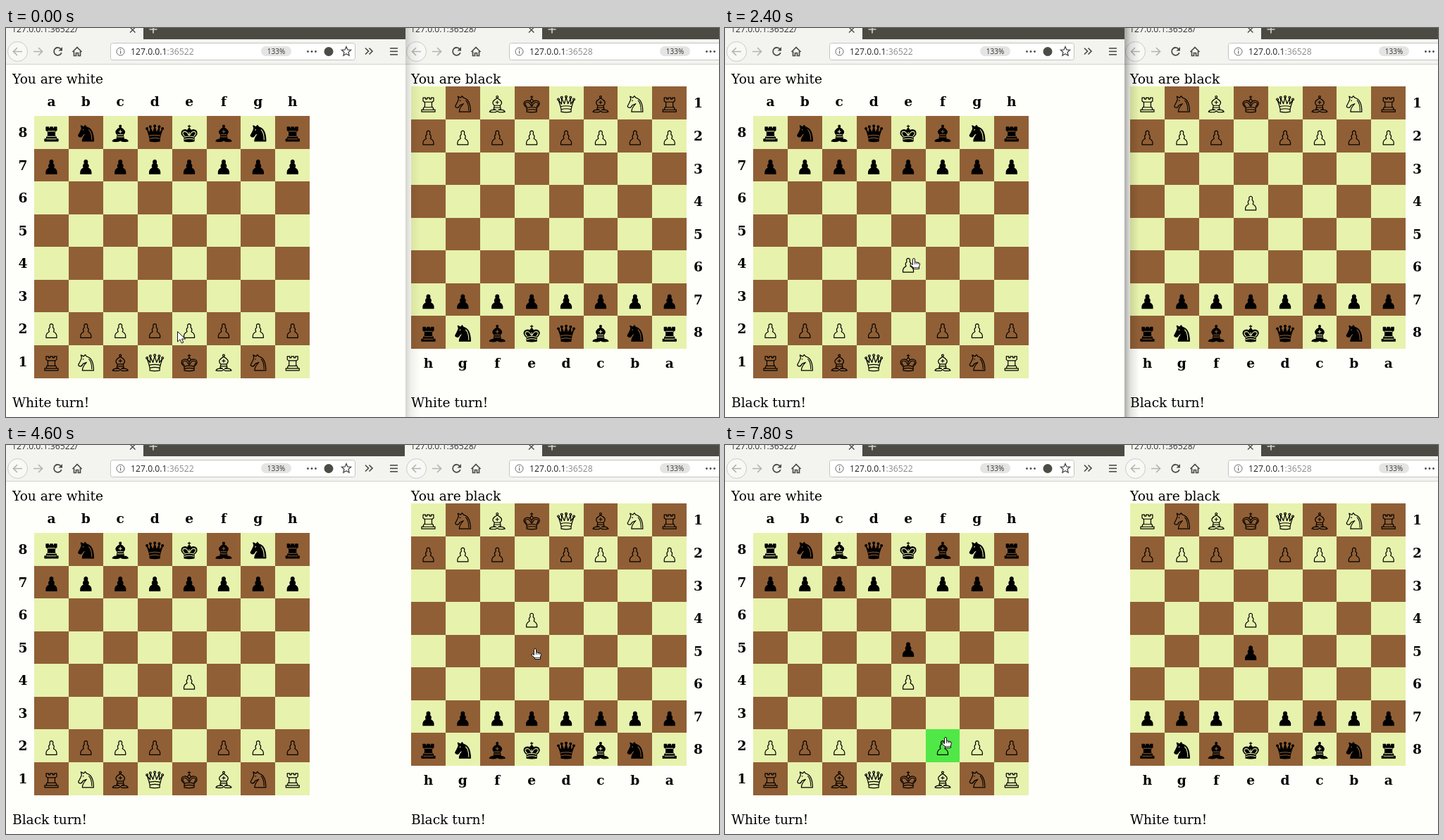
An HTML page with a canvas for the animation above (8000 ms loop, 1012 px wide and 553 px high).

```html
<!DOCTYPE html>
<html lang="en">
<head>
<meta charset="utf-8">
<title>Two player chess</title>
<style>
  html, body { margin: 0; width: 100%; height: 100%; overflow: hidden; background: #fefffa; }
  canvas { display: block; }
</style>
</head>
<body>
<canvas id="stage" width="1012" height="553"></canvas>
<script>
const ctx = document.getElementById('stage').getContext('2d');
const LOOP = 8000, STEP = 100, SPLIT = 567;
const SERIF = '18.6px "DejaVu Serif", "Noto Serif", serif';
const UI = 'Ubuntu, "Open Sans", sans-serif';
const DARK = '#4b4b48', FAINT = '#b4b4b0';

// Cursor moves: first step, last step, x and y reached (top left of the hand)
const MOVES = [
  [0, 0, 243, 431], [200, 200, 239, 431], [400, 400, 253, 431], [600, 600, 255, 431],
  [800, 800, 250, 431], [1200, 1200, 254, 415], [1300, 1500, 270, 340], [1600, 1700, 262, 327],
  [2700, 2700, 263, 329], [2900, 3000, 320, 335], [3100, 3400, 725, 386], [3500, 3600, 745, 394],
  [3800, 3800, 739, 365], [3900, 3900, 744, 309], [4000, 4100, 747, 280], [4200, 4300, 745, 289],
  [6600, 6600, 725, 298], [6700, 6900, 519, 352], [7100, 7100, 367, 391],
  [7200, 7400, 318, 417], [7500, 7800, 307, 415]
];

// Body outline and inner lines of each piece, standing on the origin
const dot = (x, y) => `M${x - 1.4} ${y}a1.4 1.4 0 1 0 2.8 0a1.4 1.4 0 1 0 -2.8 0z`;
const PIECES = {
  p: ['M-7.5-.5V-3.5Q-7-7-3-9Q-5-13-2-15Q-3.4-20 0-20.2Q3.4-20 2-15Q5-13 3-9Q7-7 7.500-3.500V-.5z', ''],
  r: ['M-9.500-.5V-3.500H-7V-6L-5-8V-14L-7.500-16V-20.500H-4V-18.500H-1.800V-20.500H1.800V-18.500H4V-20.500H7.500V-16' +
    'L5-14V-8L7-6V-3.500H9.500V-.5z', 'M-6-7H6M-5.500-14.500H5.500M-7-3.500H7'],
  n: ['M-5-.5Q-5-6 1-12L-4-10Q-6-6-8-6.500Q-11-7-10.500-9Q-7-15-6-18.500L-7-22.500L-3-20.500L-1-23L1-20.500Q11-18 11-.5z',
    'M-4.500-16l1.500-1M4-17Q8.500-13 8.500-2'],
  b: ['M-11-.5Q-9.500-3.500-5-3.200H-1.500L-5-4.500L-4-9.500Q-7-12-6-15Q-4-18 0-20Q4-18 6-15Q7-12 4-9.500L5-4.500' +
    'L1.500-3.200H5Q9.500-3.500 11-.5Q5 .5 2-.300L0-1.800L-2-.300Q-5 .5-11-.5z' + dot(0, -21.8),
    'M0-16.500V-11.500M-2.500-14H2.500M-4-9.500H4M-4.500-6.500H4.500'],
  q: ['M-7-.5V-4L-8.500-10L-11-17.500L-6.500-11.500V-20L-2.500-12L0-21L2.500-12L6.500-20V-11.500L11-17.500L8.500-10L7-4V-.5Q0 1-7-.5z' +
    dot(-11, -18.3) + dot(-6.3, -21) + dot(0, -22) + dot(6.3, -21) + dot(11, -18.3),
    'M-8-8Q0-10 8-8M-7-4Q0-6 7-4'],
  k: ['M-7-.5V-6Q-13-11-10-15Q-5-19 0-13Q5-19 10-15Q13-11 7-6V-.5Q0 1-7-.5z' +
    'M0-13Q-4.500-15.500 0-19Q4.500-15.500 0-13zM0-19V-23.500M-2.200-21.700H2.200',
    'M0-13V-8M-6.500-7.500Q-10.500-11-8.500-13.500Q-4-16-.8-9M6.500-7.500Q10.500-11 8.500-13.500Q4-16 .8-9M-7-6Q0-8.500 7-6M-7-3Q0-5 7-3']
};

function rect(x, y, w, h, fill) {
  ctx.fillStyle = fill;
  ctx.fillRect(x, y, w, h);
}

function text(str, x, y, font, fill = '#000', align = 'left') {
  ctx.font = font;
  ctx.fillStyle = fill;
  ctx.textAlign = align;
  ctx.fillText(str, x, y);
}

function shape(d, stroke, fill, width = 1.5) {
  const path = new Path2D(d);
  ctx.lineWidth = width;
  if (fill) { ctx.fillStyle = fill; ctx.fill(path); }
  if (stroke) { ctx.strokeStyle = stroke; ctx.stroke(path); }
}

function circle(x, y, r, stroke, fill) {
  shape(`M${x - r} ${y}a${r} ${r} 0 1 0 ${2 * r} 0a${r} ${r} 0 1 0 ${-2 * r} 0z`, stroke, fill, 1);
}

function pill(x, y, w, h, r, stroke, fill) {
  ctx.beginPath();
  ctx.roundRect(x, y, w, h, r);
  ctx.fillStyle = fill;
  ctx.fill();
  if (stroke) { ctx.lineWidth = 1; ctx.strokeStyle = stroke; ctx.stroke(); }
}

function star(x, y) {
  let d = '';
  for (let i = 0; i < 10; i++) {
    const a = i * Math.PI / 5, r = i % 2 ? 3.2 : 7;
    d += `${i ? 'L' : 'M'}${x + r * Math.sin(a)} ${y - r * Math.cos(a)}`;
  }
  shape(d + 'z', DARK, null, 1.3);
}

function browser(port) {
  rect(0, 0, 600, 52, '#f3f3f0');
  rect(195, 0, 405, 16, '#4b4a43');
  rect(0, 51, 600, 1, '#d2d2ce');
  rect(0, 52, 600, 501, '#fefffa');
  text(`127.0.0.1:${port}/`, 8, 6, '12.2px ' + UI, '#333');
  shape('M176-1l7.500 7.500M183.500-1l-7.500 7.500', DARK, null, 1.4);
  shape('M203.500 2h11M209-3v10.500', '#d5d4cc', null, 1.6);

  circle(16.5, 33.5, 14, '#cacac6', '#f8f8f6');
  shape('M23 33.500H11M16 28l-5.500 5.500l5.500 5.500', FAINT, null, 1.7);
  shape('M39 33.500H51M46 28l5.500 5.500l-5.500 5.500', FAINT, null, 1.7);
  shape('M78 30a5.500 5.500 0 1 0 .800 5', DARK, null, 1.8);
  shape('M80 27v5.500h-5.500z', null, DARK);
  shape('M94.500 34l6.500-6.500l6.500 6.500M96.500 33v6.500h3v-4h3v4h3v-6.500', DARK, null, 1.7);

  pill(148.5, 21.5, 347, 24, 3, '#c4c4c0', '#fff');
  circle(162.5, 33.5, 5.5, '#666');
  rect(162, 32.5, 1.2, 4, '#666');
  rect(162, 30, 1.2, 1.3, '#666');
  const font = '12.2px ' + UI, host = '127.0.0.1';
  text(host, 177, 38, font, '#222');
  text(':' + port, 177 + ctx.measureText(host).width, 38, font, '#8a8a88');
  pill(362, 26, 43, 14, 7, null, '#e4e4e2');
  text('133%', 383.5, 37, '10px ' + UI, '#333', 'center');
  for (const x of [428.5, 434, 439.5]) circle(x, 33.5, 1.4, null, DARK);
  circle(458, 33.5, 6.5, null, DARK);
  star(483, 33.5);
  shape('M510 28.500l4.500 4.500l-4.500 4.500M515.500 28.500l4.500 4.500l-4.500 4.500', DARK, null, 1.7);
  for (const y of [28, 32.5, 37]) rect(545, y, 11, 1.6, DARK);
}

// Upper case is white, lower case is black
function pieceAt(file, rank, whiteMoved, blackMoved) {
  if (file === 4 && rank > 1 && rank < 8) {
    if (rank === (whiteMoved ? 4 : 2)) return 'P';
    return rank === (blackMoved ? 5 : 7) ? 'p' : '';
  }
  return { 1: 'RNBQKBNR'[file], 2: 'P', 7: 'p', 8: 'rnbqkbnr'[file] }[rank] || '';
}

function piece(name, x, y, ground) {
  const kind = name.toLowerCase(), black = name === kind;
  const [body, lines] = PIECES[kind];
  ctx.save();
  ctx.translate(x, y);
  ctx.lineJoin = 'round';
  shape(body, '#000', black && '#000', 1.2);
  shape(lines, black ? ground : '#000', null, 1.1);
  ctx.restore();
}

function board(x0, y0, flipped, picked, whiteMoved, blackMoved) {
  const w = 48.9, h = 46.58, label = 'bold ' + SERIF;
  for (let r = 0; r < 8; r++) {
    const rank = flipped ? r + 1 : 8 - r, y = y0 + r * h;
    const top = Math.round(y), bottom = Math.round(y + h);
    text(rank, flipped ? 982.5 : 24, y + 30, label, '#000', 'center');
    for (let c = 0; c < 8; c++) {
      const file = flipped ? 7 - c : c, name = 'abcdefgh'[file];
      const left = Math.round(x0 + c * w), right = Math.round(x0 + (c + 1) * w);
      const mid = x0 + (c + 0.5) * w;
      const fill = picked === name + rank ? '#50e846' : (r + c) % 2 ? '#905f36' : '#e7f2ad';
      rect(left, top, right - left, bottom - top, fill);
      const man = pieceAt(file, rank, whiteMoved, blackMoved);
      if (man) piece(man, mid, y + 36.3, fill);
      if (!r) text(name, mid, flipped ? 483 : 111, label, '#000', 'center');
    }
  }
}

function page(x, color, blackTurn) {
  text('You are ' + color, x, 78.5, SERIF);
  text((blackTurn ? 'Black' : 'White') + ' turn!', x, 538.5, SERIF);
}

function cursorAt(t) {
  let x = 243, y = 431;
  for (const [start, end, tx, ty] of MOVES) {
    if (t < start) break;
    const p = Math.min(1, (t - start + STEP) / (end - start + STEP));
    x += (tx - x) * p;
    y += (ty - y) * p;
  }
  return [Math.round(x), Math.round(y)];
}

function cursor(t) {
  ctx.save();
  ctx.translate(...cursorAt(t));
  ctx.lineJoin = 'round';
  if (t < 800) {
    shape('M.5.5V15L4 11.800L6.300 17L8.800 16L6.600 11H11.500z', '#111', '#fff', 1);
  } else {
    shape('M4.500 9.500V2Q4.500.5 6 .5T7.500 2V5.500L13 6.800Q14.700 7.200 14.500 9L13.500 12V15.500H5.500V13.500' +
      'L1 10Q.3 8 2.500 8.200z', '#111', '#fff', 1);
    shape('M7.500 5.500V9M10 6.200V9M12.300 6.800V9M5.500 13.500H13.500', '#111', null, 0.8);
  }
  ctx.restore();
}

function shadow(strength) {
  const g = ctx.createLinearGradient(SPLIT, 0, SPLIT + 21, 0);
  g.addColorStop(0, `rgba(0,0,0,${strength})`);
  g.addColorStop(0.4, `rgba(0,0,0,${strength * 0.35})`);
  g.addColorStop(1, 'rgba(0,0,0,0)');
  rect(SPLIT, 0, 21, 553, g);
}

function draw(now) {
  const t = Math.floor(now % LOOP / STEP) * STEP;
  const during = (a, b) => t >= a && t < b;
  const rightActive = during(3500, 7800);

  browser(36522);
  page(9, 'white', during(2000, 5200));
  const pickedLeft = during(800, 1900) ? 'e2' : t >= 7800 ? 'f2' : '';
  board(40, 125, false, pickedLeft, t >= 2000, t >= 5200);

  ctx.save();
  ctx.beginPath();
  ctx.rect(rightActive ? SPLIT - 1 : SPLIT, 0, 446, 553);
  ctx.clip();
  ctx.translate(566, 0);
  browser(36528);
  ctx.restore();
  page(575, 'black', during(2400, 5000));
  board(575, 83.4, true, during(3500, 4600) ? 'e7' : '', t >= 2400, t >= 5000);

  if (t < 3500) shadow(t < 800 ? 0.16 : t < 900 ? 0.24 : 0.32);
  cursor(t);
}

function frame(now) {
  draw(now);
  requestAnimationFrame(frame);
}
draw(0);
requestAnimationFrame(frame);
</script>
</body>
</html>
```
